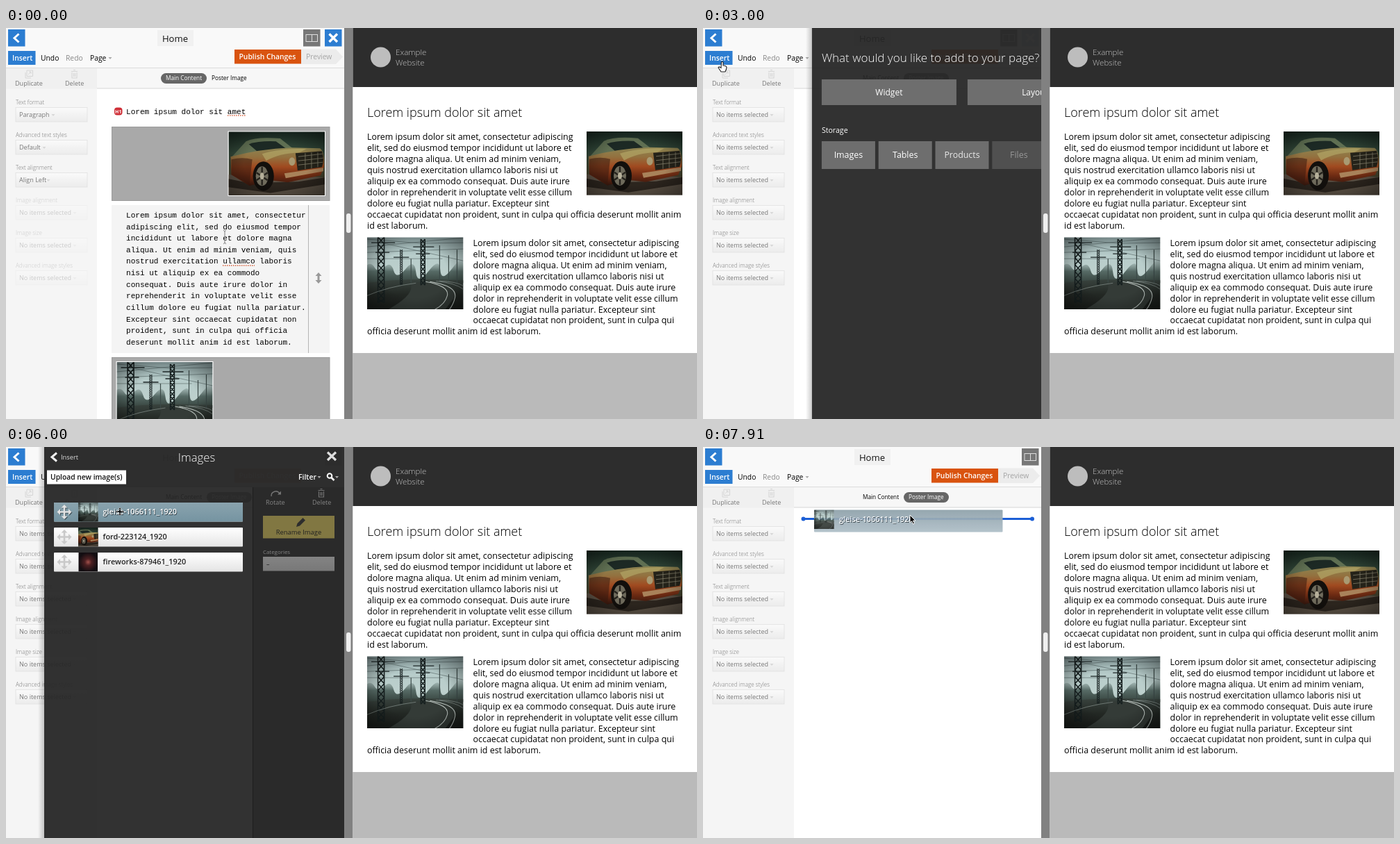
Animation, 995 px wide and 563 px high, one loop 8 s. Source, as an HTML page:

```html
<!DOCTYPE html>
<html lang="en">
<head>
<meta charset="utf-8">
<title>Page editor</title>
<style>
html, body { margin: 0; width: 100%; height: 100%; overflow: hidden; background: #fff; }
svg { display: block; }
#stage { width: 100vw; height: 100vh; font-family: "Open Sans", sans-serif; }
text { white-space: pre; }
.mono { font-family: "Liberation Mono", monospace; }
</style>
</head>
<body>
<svg id="stage" viewBox="0 0 995 563" preserveAspectRatio="none"></svg>
<script>
const LOREM = ('Lorem ipsum dolor sit amet, consectetur adipiscing elit, sed do eiusmod tempor incididunt ut labore ' +
  'et dolore magna aliqua. Ut enim ad minim veniam, quis nostrud exercitation ullamco laboris nisi ut aliquip ex ea ' +
  'commodo consequat. Duis aute irure dolor in reprehenderit in voluptate velit esse cillum dolore eu fugiat nulla ' +
  'pariatur. Excepteur sint occaecat cupidatat non proident, sunt in culpa qui officia deserunt mollit anim id est ' +
  'laborum.').split(' ');

// Drawing helpers; text is placed by its vertical centre
const text = (x, y, str, size, fill = '#000', extra = '') =>
  `<text x="${x}" y="${y + size * 0.36}" font-size="${size}" fill="${fill}" ${extra}>${str}</text>`;
const rect = (x, y, w, h, fill, extra = '') =>
  `<rect x="${x}" y="${y}" width="${w}" height="${h}" fill="${fill}" ${extra}/>`;
const line = (d, stroke, width = 1, extra = '') =>
  `<path d="${d}" fill="none" stroke="${stroke}" stroke-width="${width}" ${extra}/>`;
const shape = (d, fill, extra = '') => `<path d="${d}" fill="${fill}" ${extra}/>`;
const ellipse = (x, y, rx, ry, fill) => `<ellipse cx="${x}" cy="${y}" rx="${rx}" ry="${ry}" fill="${fill}"/>`;
const group = (id, body, extra = '') => `<g id="${id}" ${extra}>${body}</g>`;
const photo = (id, x, y, w, h) => `<use href="#${id}" x="${x}" y="${y}" width="${w}" height="${h}"/>`;
const caret = (x, y, fill) => shape(`M${x - 2.5} ${y - 1}h5l-2.5 3z`, fill);
const gradient = (id, colors, extra = 'x2="0" y2="1"') => `<linearGradient id="${id}" ${extra}>` +
  colors.map((c, i) => `<stop offset="${i / (colors.length - 1)}" stop-color="${c}"/>`).join('') + '</linearGradient>';
const MID = 'text-anchor="middle" ', SEMI = 'font-weight="600"', LIGHT = 'font-weight="300"';

function paragraph(counts, place, size, extra) {
  let word = 0;
  return counts.map((n, i) => {
    const [x, y] = place(i);
    return text(x, y, LOREM.slice(word, word += n).join(' '), size, '#000', extra);
  }).join('');
}

function tower(x, top, bottom, w, weight) {
  const step = w * 1.1;
  let d = `M${x - w / 2} ${bottom}V${top}M${x + w / 2} ${bottom}V${top}`;
  for (let y = top; y < bottom; y += step) {
    const end = Math.min(y + step, bottom);
    d += `M${x - w / 2} ${y}L${x + w / 2} ${end}M${x + w / 2} ${y}L${x - w / 2} ${end}`;
  }
  return line(d, '#161f1f', weight);
}

const defs = `<defs>
${gradient('fog', ['#8fa5a6', '#b7ccca', '#bdd0cd', '#8fa5a0', '#5c6c66'])}
${gradient('trees', ['#74898600', '#566a65', '#35423d'])}
${gradient('ground', ['#39433e', '#232824', '#1a1e1b'])}
${gradient('dusk', ['#1a2b23', '#33493a', '#45452f', '#2c231c'])}
${gradient('body', ['#8c8552', '#93713f', '#a04a20', '#6d2a12', '#34170e'])}
${gradient('field', ['#ffffff', '#e4e4e4'])}
${gradient('picked', ['#8aa3ae', '#7594a1'])}
${gradient('carried', ['#8da0a9', '#aebec7'])}
${gradient('edge', ['#0000', '#0003'], 'x2="1" y2="0"')}
<radialGradient id="burst"><stop offset="0" stop-color="#a3514c"/><stop offset=".35" stop-color="#4d2022"/>
<stop offset="1" stop-color="#120d11"/></radialGradient>
<radialGradient id="vignette" r=".75"><stop offset=".45" stop-color="#000" stop-opacity="0"/>
<stop offset="1" stop-color="#000" stop-opacity=".5"/></radialGradient>
<clipPath id="editor"><path d="M0 0H487V563H0z"/></clipPath>
<symbol id="tracks" viewBox="0 0 138 104" preserveAspectRatio="xMidYMid slice">
${rect(0, 0, 138, 104, 'url(#fog)')}
${shape('M0 40Q6 36 11 44T25 43T38 48T55 46T70 50T88 49T105 47T122 45T138 38V66H0z', 'url(#trees)')}
${shape('M0 66Q50 58 138 62V104H0z', 'url(#ground)')}
${shape('M30 104Q70 82 62 66L96 64Q134 72 124 88L112 104z', '#343b37')}
${line('M0 14L138 1M0 22L138 17M0 3L80 9L138 8M20 8L138 34M0 31H108', '#3d4b4a', .5)}
${line('M104 12V64M117 26V64M129 18V66M63 31V66', '#3b4947', 1.2)}
${tower(20, 0, 94, 9, 1.6)}${tower(80, 3, 69, 6, 1.4)}${tower(49, 18, 68, 3, .8)}
${line('M6 8H40M12 22H32M66 14H96M70 24H90M38 29H60', '#1f2928', 1.3)}
${line('M84 64Q118 70 115 84Q112 96 97 104M90 64Q130 70 126 87Q124 96 118 104', '#bcc5c0', 1.1)}
${line('M99 63Q127 66 138 75M104 63Q129 64 138 70M70 66Q30 71 0 84', '#87938e', .7)}
${rect(0, 0, 138, 104, 'url(#vignette)')}</symbol>
<symbol id="car" viewBox="0 0 138 92" preserveAspectRatio="xMidYMid slice">
${rect(0, 0, 138, 92, 'url(#dusk)')}
${shape('M0 62Q60 60 138 66V92H0z', '#5b5145')}
${shape('M0 68L30 74L100 72L138 66V76L60 88L0 80z', '#1d1712', 'opacity=".75"')}
${shape('M5 36L25 14Q40 7 74 10L92 24L50 34z', '#5f6f52')}
${shape('M29 18Q44 13 68 14L82 24L44 31z', '#1c2924')}
${shape('M3 36Q44 25 90 23L131 24Q138 28 137 51L132 63L85 73L60 70L30 78L4 62z', 'url(#body)')}
${shape('M4 40Q20 36 34 40L30 76L4 62z', '#3a1a10', 'opacity=".55"')}
${shape('M48 32Q72 24 112 24.500L102 30Q72 31 54 42z', '#b3a565', 'opacity=".7"')}
${shape('M96 31L134 28Q138 40 134 51L99 56z', '#242219')}
${line('M100 36L135 32M100 42L136 38M100 48L135 44M110 31V54M119 30V53M128 30V51', '#807c68', .8)}
${shape('M80 60L136 52V57L82 67z', '#a9825a')}
${ellipse(50, 64, 15, 21, '#120f0c')}${ellipse(48, 64, 9, 14, '#6f6b5c')}
${line('M48 51V77M40 59L56 70M56 59L40 70', '#25221c', 2.4)}
${ellipse(48, 64, 3, 5, '#b6b09a')}${ellipse(91, 43, 4.5, 6, '#a99a72')}
${rect(0, 0, 138, 92, 'url(#vignette)')}</symbol>
<symbol id="sparks" viewBox="0 0 28 28">${rect(0, 0, 28, 28, 'url(#burst)')}</symbol>
<g id="cross"><path d="M-9 0H9M0-9V9" fill="none" stroke="currentColor" stroke-width="2.6"/>
<path d="M-10.5 0l4.5-4.5v9zM10.5 0l-4.5-4.5v9zM0-10.5l-4.5 4.5h9zM0 10.5l-4.5-4.5h9z" fill="currentColor"/></g>
</defs>`;

const splitIcon = id => group(id, rect(428, 2, 24.5, 24.5, '#777') +
  rect(432, 9.5, 16.5, 10, 'none', 'stroke="#ddd"') + line('M440.500 9.500V19.500', '#ddd'));

const toolbar = rect(0, 0, 487, 58, '#f9f9f9') + rect(0, 57, 487, 1, '#dcdcdc') +
  rect(3, 2, 24.5, 24.5, '#2c7dd1') + line('M18.5 8.5L12 14.5L18.5 20.5', '#fff', 3) +
  rect(218, 3, 52, 23, '#f1f1f1') + text(243.5, 15, 'Home', 13.1, '#111', MID) + splitIcon('split') +
  group('close', rect(459, 2, 24.5, 24.5, '#2c7dd1') + line('M465.5 8.5L477 20M477 8.5L465.5 20', '#fff', 3.4)) +
  rect(3, 33, 39.5, 20, '#2c7dd1') + text(9, 43, 'Insert', 10.4, '#fff', SEMI) +
  text(50, 43, 'Undo', 10.3) + text(86, 43, 'Redo', 10.3, '#888') + text(121, 43, 'Page', 10.3) + caret(150, 43, '#aaa') +
  shape('M425 30.5H475L485 41.5L475 52H425z', '#ececec') + text(432, 41, 'Preview', 10.4, '#a5a5a5') +
  rect(329, 31, 96, 20.5, '#d9530f') + text(335.5, 41, 'Publish Changes', 10.35, '#fff', SEMI);

const LABELS = ['Text format', 'Advanced text styles', 'Text alignment', 'Image alignment', 'Image size', 'Advanced image styles'];
const NONE = ['No items selected', 99];
const TYPED = [['Paragraph', 68], ['Default', 55], ['Align Left', 61], NONE, NONE, NONE];
const fields = (values, dim) => LABELS.map((label, i) => {
  const y = 107 + 47 * i;
  return `<g opacity="${dim && i > 2 ? .33 : 1}">` + text(14, y, label, 8.1, '#000', LIGHT) +
    rect(14, y + 7.5, 103, 20.5, 'url(#field)', 'stroke="#ccc" stroke-width=".8"') +
    text(19, y + 18, values[i][0], 9.05) + caret(values[i][1], y + 18, '#bbb') + '</g>';
}).join('');

const trash = (x, y) => line(`M${x - 4.5} ${y - 3.5}H${x + 4.5}M${x - 1.5} ${y - 5.5}H${x + 1.5}M${x - 3.5} ${y - 2}V${y + 6}H${x + 3.5}V${y - 2}M${x - 1} ${y - 1}V${y + 4}M${x + 1} ${y - 1}V${y + 4}`, 'currentColor', 1.1);
const sidebar = rect(0, 58, 131, 505, '#f5f5f5') + rect(0, 58, 131, 29.5, '#f0f0f0') +
  group('sideTools', text(13, 80, 'Duplicate', 9.05) + text(85, 80, 'Delete', 9.05)) +
  group('sideIcons', line('M30 61H38.500V69.500H30zM28 64V72H36M32 67L36 63M33 63H36V66', '#444') + trash(98.5, 66), 'color="#444"') +
  group('sideTyped', fields(TYPED, true), 'opacity=".5"') + group('sideNone', fields(Array(6).fill(NONE)));

const tabs = rect(131, 58, 356, 29, '#f7f7f7') + rect(131, 86.5, 356, 1, '#d5d5d5') +
  group('tabMain', rect(223, 65, 66, 15, '#666', 'rx="7.500"') +
    text(230, 72, 'Main Content', 8.25, '#fff') + text(296, 72, 'Poster Image', 8.25)) +
  group('tabPoster', rect(289, 65, 65, 15, '#666', 'rx="7.500"') +
    text(230, 72, 'Main Content', 8.25) + text(296, 72, 'Poster Image', 8.25, '#fff'));

const squiggle = (x1, x2, y) => line(`M${x1} ${y}H${x2}`, '#d8603c', 1.4, 'stroke-dasharray="1.500 1.500"');
const slab = (y, h) => rect(152.5, y, 313.5, h, '#a9a9a9', 'stroke="#9b9b9b"');
const content = group('content',
  rect(156, 114.5, 11.5, 11, '#cf2e36', 'rx="4"') + text(161.8, 120, 'H1', 7, '#fff', MID + 'font-weight="700"') +
  text(173, 120, 'Lorem ipsum dolor sit amet', 11.05, '#000', 'class="mono"') + squiggle(319, 345, 126) +
  slab(142.5, 106) + rect(319.5, 148.5, 140.5, 93.5, '#fff') + photo('car', 320.5, 149.5, 138.5, 91.5) +
  group('hover', rect(152, 255, 314, 213, '#f4f4f4') + rect(435, 255, 1, 213, '#b5b5b5') +
    shape('M450 352l4.500 5h-3v6h3l-4.500 5l-4.500-5h3v-6h-3z', '#999')) +
  paragraph([6, 6, 6, 7, 4, 6, 6, 5, 6, 5, 6, 6], i => [173, 269 + 16.63 * i], 11.05, 'class="mono"') +
  squiggle(312, 358, 342) + slab(474.5, 120) + rect(158.5, 480, 140, 106, '#fff') + photo('tracks', 159.5, 481, 138, 104));

const bigCross = (x, y, color) => `<use href="#cross" transform="translate(${x} ${y})" color="${color}"/>`;
const ROWS = [['tracks', 'gleise-1066111_1920'], ['car', 'ford-223124_1920'], ['sparks', 'fireworks-879461_1920']];
const shadowed = (x, y, str) => text(x + .8, y + .8, str, 10.9, '#2c3a42', SEMI) + text(x, y, str, 10.9, '#fff', SEMI);

const rows = ROWS.map((_, i) => rect(69, 80 + 36 * i, 272, 27.5, 'url(#field)', 'rx="1"')).join('') +
  group('rowTexts', ROWS.map(([, name], i) => bigCross(84, 93.5 + 36 * i, '#c9c9c9') +
    text(139.5, 93.5 + 36 * i, name, 10.9, '#222', SEMI)).join('')) +
  group('rowPicked', rect(69, 80, 272, 27.5, 'url(#picked)', 'rx="1"') + bigCross(85, 94.5, '#3f4f57') +
    bigCross(84, 93.5, '#e2e2e2') + shadowed(139.5, 93.5, ROWS[0][1])) +
  group('thumbs', ROWS.map(([id], i) => photo(id, 104, 80 + 36 * i, 28.5, 27.5)).join(''));

const details = rect(355, 58, 132, 505, '#2a2a2a') + rect(355, 58, 1, 505, '#1d1d1d') +
  group('details', line('M382 71A6.500 6.500 0 0 1 394 67', '#ddd', 1.4) + shape('M391 68.500h5v-5z', '#ddd') +
    `<g color="#ddd">${trash(454, 66)}</g>` + text(374, 80, 'Rotate', 9.1, '#fff') + text(441, 80, 'Delete', 9.05, '#fff') +
    rect(370, 99, 103, 32.5, '#fae264') + shape('M418 115l1.500-5l8-8l3.500 3.500l-8 8z', '#333') +
    text(421.5, 122.5, 'Rename Image', 9.4, '#111', MID) + text(370, 151, 'Categories', 7.9, '#fff') +
    group('category', rect(370, 158, 103, 20.5, 'url(#field)') +
      group('categoryText', text(375, 168.5, 'My new gallery, My ...', 9)) +
      group('categoryNone', text(375, 168.5, '–', 9)))) +
  group('big', photo('tracks', 356, 199, 131, 115));

const button = (x, y, w, h, label, size, dim = 1) => rect(x, y, w, h, '#6e6e6e', `opacity="${dim < 1 ? .5 : 1}"`) +
  group('label' + label, text(x + w / 2, y + h / 2, label, size, '#fff', MID), `opacity="${dim}"`);
const choices = group('choices',
  text(69, 43, 'What would you like to add to your page?', 17, '#fff', LIGHT) +
  button(69, 74, 194, 37, 'Widget', 12) + button(279, 74, 194, 37, 'Layout', 11.9) + text(69, 147, 'Storage', 10.6, '#fff') +
  ['Images', 'Tables', 'Products', 'Files'].map((name, i) =>
    button(69 + 81.8 * i, 163, 77, 40, name, 12.4, name == 'Files' ? .4 : 1)).join(''));
const library = group('library',
  rect(55, 0, 432, 58, '#2d2d2d', 'opacity=".7"') + line('M73 8.500L66 14.500L73 20.500', '#eee', 3) + text(79, 15, 'Insert', 9.3, '#ddd') +
  text(274.5, 15, 'Images', 16.7, '#fff', MID + LIGHT) +
  rect(59, 33.5, 114, 20, '#fff') + text(64, 43, 'Upload new image(s)', 10.3, '#111', SEMI) +
  text(421, 43, 'Filter', 10.4, '#fff', SEMI) + caret(451, 43, '#aaa') + caret(476.5, 43, '#aaa') +
  '<circle cx="466" cy="41.500" r="3.300" fill="none" stroke="#fff" stroke-width="2"/>' + line('M468.500 44L472.500 48', '#fff', 2.5) +
  details + rows);
const panel = `<g clip-path="url(#editor)">` + group('panel',
  rect(46, 0, 9, 563, 'url(#edge)') + rect(55, 0, 432, 563, '#272727', 'fill-opacity=".945"') +
  choices + library + line('M463 7.500L475 19M475 7.500L463 19', '#ddd', 3.2)) + '</g>';

const divider = rect(487, 0, 12.5, 563, '#818181') + rect(490, 267, 6.5, 28, '#efefef', 'rx="3"');
const website = rect(499.5, 0, 496, 85, '#2d2d2d') + rect(499.5, 85, 496, 383, '#fff') + rect(499.5, 468, 496, 95, '#bababa') +
  '<circle cx="539.500" cy="42" r="14.500" fill="#bdbdbd"/>' +
  text(561, 34.5, 'Example', 11.6, '#c4c4c4', LIGHT) + text(561, 49.5, 'Website', 11.6, '#c4c4c4', LIGHT) +
  text(520, 122, 'Lorem ipsum dolor sit amet', 18, '#000', LIGHT) +
  paragraph([7, 9, 8, 7, 8, 8, 7, 12, 3], i => [520, 157 + 15.93 * i], 12.46) + photo('car', 836, 149, 138, 91.5) +
  paragraph([7, 9, 8, 7, 8, 8, 7, 8, 7], i => [i < 8 ? 672.5 : 520, 309.5 + 15.93 * i], 12.46) + photo('tracks', 520, 301.5, 138.5, 103.5);

const dropMark = group('dropMark', line('M144 103.500H474', '#1c5fd6', 3) +
  ellipse(144.5, 103.5, 3, 3, '#1c5fd6') + ellipse(474, 103.5, 3, 3, '#1c5fd6'));
const carried = group('carried', rect(0, 0, 271.5, 32, 'url(#carried)', 'rx="1"') + photo('tracks', 0, 0, 28.5, 27.5) +
  shadowed(36, 13.5, ROWS[0][1]), 'opacity=".92"');

const outlined = 'stroke="#fff" stroke-width="1"';
const cursors = group('cursor',
  group('beam', line('M-2-10Q0-9 0-7V7Q0 9-2 10M2-10Q0-9 0-7M0 7Q0 9 2 10', '#9a9a9a', 1.3)) +
  group('hand', shape('M-1.500-6Q0-7 1-6V-1Q5-1 6 1.500Q6 4 4 8H-2L-6 2Q-5 0-2 2.500z', '#fff', 'stroke="#222" stroke-width="1.100"')) +
  group('move', `<use href="#cross" transform="scale(.56)" color="#000" ${outlined}/>`) +
  group('grip', line('M-4-4H4M-5-1H5M-4 2H5M-3 5H4', '#39474e', 1.4, 'opacity=".8"')) +
  group('arrow', shape('M0-6V5L2.500 2.800L4.500 7L6.500 6L4.500 2H8z', '#000', outlined)));

const stage = document.getElementById('stage');
stage.innerHTML = defs + rect(0, 0, 487, 563, '#fff') + content + toolbar + sidebar + tabs + panel +
  divider + website + dropMark + carried + cursors;

const el = Object.fromEntries([...stage.querySelectorAll('g[id]')].map(g => [g.id, g]));
const show = (id, on) => el[id].setAttribute('visibility', on ? 'inherit' : 'hidden');
const fade = (id, value) => el[id].setAttribute('opacity', value);
const move = (id, x, y) => el[id].setAttribute('transform', `translate(${x} ${y})`);
const ramp = (t, from, to) => Math.max(0, Math.min(1, (t - from) / (to - from)));
const easeOut = p => 1 - (1 - p) ** 3;
const smooth = p => p * p * (3 - 2 * p);

const LOOP = 8000, TICK = 1000 / 11;
const PATH = [[0, 315, 301], [730, 329, 77], [1640, 329, 77], [2360, 28, 55], [3360, 28, 55], [3550, 72, 99],
  [4000, 81, 180], [4910, 81, 177], [5640, 164, 93], [6000, 164, 93], [6640, 236, 91], [7090, 236, 91],
  [7640, 286, 104], [7730, 286, 104], [7910, 298, 104]];
const KINDS = [[0, 'beam'], [320, 'arrow'], [620, 'hand'], [4355, 'move'], [6180, 'grip'], [7175, 'arrow']];

function cursorAt(t) {
  const i = PATH.findIndex(p => p[0] > t);
  if (i < 1) return PATH.at(-1).slice(1);
  const [t0, x0, y0] = PATH[i - 1], [t1, x1, y1] = PATH[i];
  const p = smooth((t - t0) / (t1 - t0));
  return [x0 + (x1 - x0) * p, y0 + (y1 - y0) * p];
}

function render(t) {
  const poster = t > 1175;
  const enabled = ramp(t, 6050, 6500) * (1 - ramp(t, 7090, 7500));
  const [x, y] = cursorAt(t);

  show('content', !poster);
  show('hover', t < 260);
  show('tabMain', !poster);
  show('tabPoster', poster);
  show('sideTyped', !poster);
  show('sideNone', poster);
  fade('sideNone', .5 + .5 * enabled);
  fade('sideTools', .5 + .5 * enabled);
  fade('sideIcons', .15 + .85 * enabled);

  fade('close', 1 - ramp(t, 2780, 3050));
  move('split', t > 3200 ? 31 : 0, 0);

  const open = easeOut(ramp(t, 2830, 3270)), gone = smooth(ramp(t, 7090, 7460));
  show('panel', open > 0 && gone < 1);
  move('panel', 441 * (1 - open + gone), 0);
  show('choices', t < 4355);
  fade('labelProducts', .85 + .15 * ramp(t, 3640, 4000));
  show('library', t > 4355);
  show('rowTexts', t > 4540);
  show('category', t > 4540);
  show('thumbs', t > 4720);
  show('rowPicked', t > 5995);
  const detail = ramp(t, 6050, 6500);
  fade('details', .42 + .58 * detail);
  show('categoryText', t > 4540 && detail > .3);
  show('categoryNone', t > 4540 && detail <= .3);
  fade('big', ramp(t, 6230, 6680));

  show('dropMark', t > 7360);
  show('carried', t > 7175);
  move('carried', x - 138, y - 13.5);
  move('cursor', x, y);
  const kind = KINDS.findLast(k => k[0] <= t)[1];
  for (const [, name] of KINDS) show(name, name === kind);
}

// Motion advances in eleven steps per second
function frame() {
  const t = performance.now() % LOOP;
  render(Math.floor((t + 5) / TICK) * TICK % LOOP);
  requestAnimationFrame(frame);
}
frame();
</script>
</body>
</html>
```
